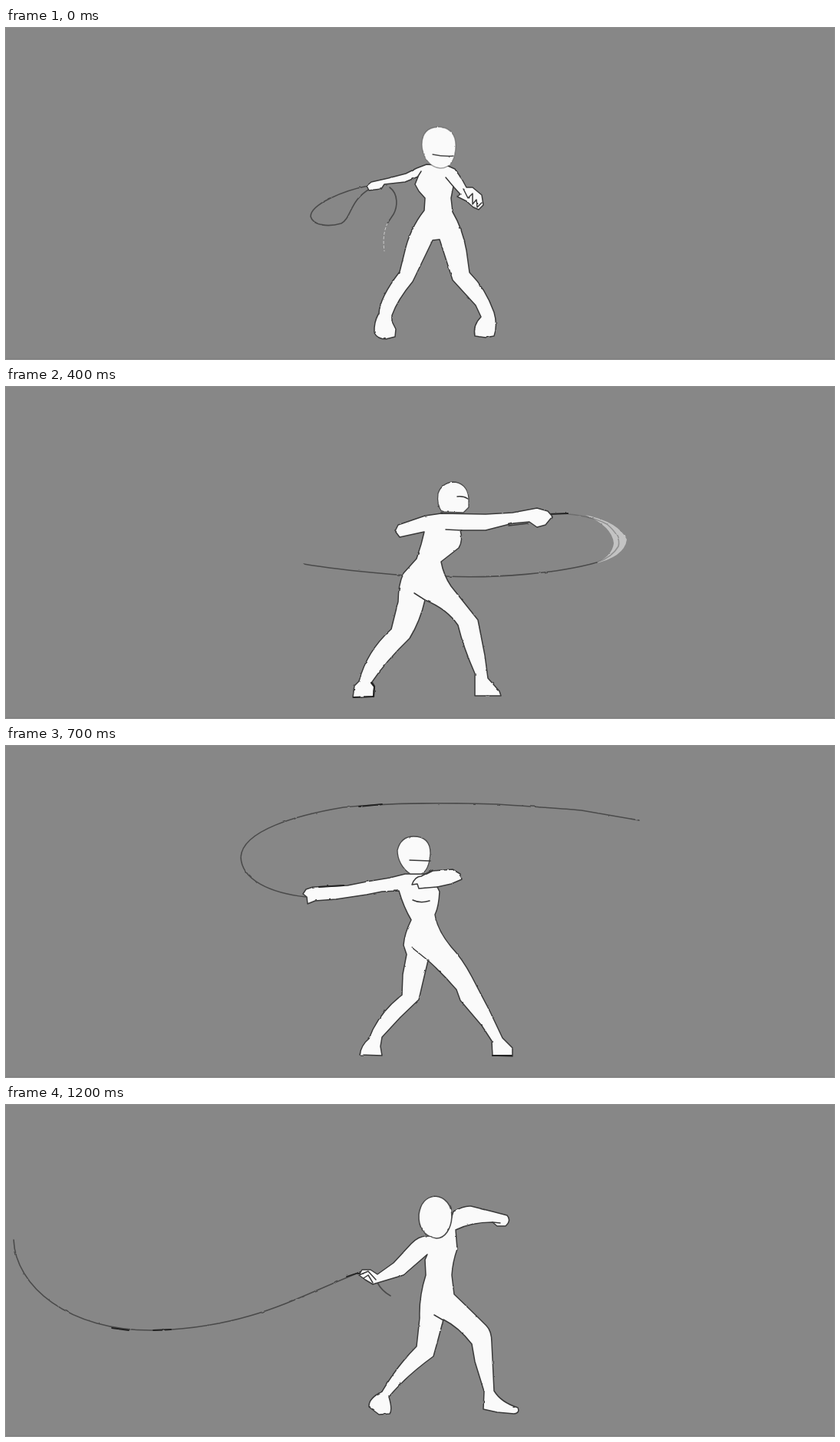
Write an HTML page without scripts that moves like this. It is 1079 by 432 pixels and loops after 1.3 s.

```html
<!DOCTYPE html>
<html lang="en">
<head>
<meta charset="utf-8">
<title>Whip swing</title>
<style>
html, body { margin: 0; width: 100%; height: 100%; overflow: hidden; background: #878787; }
svg { display: block; width: 100%; height: 100%; }
path { fill: none; stroke: #3a3a3a; stroke-width: 1.5; stroke-linejoin: round; stroke-linecap: round; }
.body, .head { fill: #fafafa; }
.head { stroke: #4a4a4a; stroke-width: 1.3; }
.whip { stroke: #4a4a4a; stroke-width: 1.6; }
.dark { stroke: #222; stroke-width: 2.2; }
.tip { stroke: #d0d0d0; stroke-width: 1; stroke-dasharray: 3 3; }
.smear { fill: url(#fade); stroke: none; }
.pose { opacity: 0; animation: show 1.3s step-end infinite; animation-delay: calc(var(--i) * .1s); }
@keyframes show { 0% { opacity: 1 } 7.6923%, 100% { opacity: 0 } }
</style>
</head>
<body>
<svg viewBox="0 0 1079 432" preserveAspectRatio="none">
<defs>
<linearGradient id="fade" x1="0" y1="0" x2="0" y2="1">
<stop offset="0" stop-color="#fff" stop-opacity="0"/>
<stop offset=".12" stop-color="#fff" stop-opacity=".2"/>
<stop offset=".3" stop-color="#fff" stop-opacity=".52"/>
<stop offset=".6" stop-color="#fff" stop-opacity=".57"/>
<stop offset="1" stop-color="#fff" stop-opacity="0"/>
</linearGradient>
<filter id="pencil" filterUnits="userSpaceOnUse" x="0" y="0" width="1079" height="432" color-interpolation-filters="sRGB">
<feTurbulence type="fractalNoise" baseFrequency=".12" numOctaves="2" seed="4"/>
<feDisplacementMap in="SourceGraphic" scale="2" xChannelSelector="R" yChannelSelector="G"/>
</filter>
</defs>

<g filter="url(#pencil)">
<g class="pose" style="--i:0">
<path class="whip" d="M472 206C440 212 397 230 397 246C400 258 420 260 437 255C450 248 448 225 474 210M500 208C512 217 510 234 505 243L497 255"/>
<path class="tip" d="M497 255Q490 270 493 291"/>
<path class="body" d="M548 178L535 183L521 190L498 196L476 201L470 206L473 212L489 210L493 204L520 201L537 194L533 204L538 213L546 222L545 238Q526 262 519 294L513 318Q487 352 486 372Q479 384 480 398Q484 406 495 406L507 403L508 393L503 383L503 375Q510 355 530 331L556 277L565 276L582 329L612 362L619 377Q608 388 611 402L625 404L636 402Q641 388 636 371Q625 340 604 319L600 290Q595 262 582 240L580 222L583 207L592 217L588 220L600 226L609 234L616 237L622 231L620 218L608 208L600 208L594 197L585 184L576 180Z"/>
<path class="head" style="stroke-opacity:.5" d="M563 129C578 129 586 139 586 153C586 170 580 183 566 183C551 182 542 166 542 152C542 138 549 130 563 129Z"/>
<path d="M573 195L583 207M541 187L536 195M596 210L602 222L608 216L608 230L613 224L614 234L620 228"/>
<path class="head" style="fill:none" d="M556 165Q570 168 583 167"/>
</g>

<g class="pose" style="--i:1">
<path class="whip" d="M486 206C455 204 430 222 437 236C450 250 480 238 500 213M585 225C600 235 606 248 598 258"/>
<path class="body" d="M562 159L548 160L532 178L505 192L488 201L484 208L491 214L504 209L530 203L541 194L544 215L543 224Q525 254 519 285L515 314Q488 345 481 367L470 380L470 404L498 404L500 394L494 379Q510 352 534 328L552 274L567 275L592 316L608 358L612 380L607 402L645 403L646 394L632 378Q628 345 616 310L592 258L580 238L579 218L585 204L597 210L606 214L611 204L602 190L592 178L588 166Z"/>
<path class="head" d="M580 123C594 123 602 133 602 147C602 161 596 173 584 174C570 173 558 161 558 146C558 132 567 124 580 123Z"/>
<path d="M584 155L600 157M552 182L541 195"/>
</g>

<g class="pose" style="--i:2">
<path class="whip" d="M477 219L508 206M583 217C600 228 628 240 627 254C624 266 604 264 594 256C583 248 580 235 580 218"/>
<path class="body" d="M574 147Q562 145 553 154L532 182L512 176L495 172L488 180L486 190L496 187L510 189L524 193L516 203L509 207L514 213L525 213L534 210L543 209L542 216L527 245Q519 262 518 280L516 308Q488 335 475 362L462 371L458 380L459 402L487 403L491 396L485 379Q505 350 538 325L546 300L551 271L568 272L601 303L601 330L606 358L605 384L602 402L652 403L653 394Q636 392 624 380L623 350L626 299L602 264L585 244L578 216L587 206L603 186L606 174L598 166L585 155Z"/>
<path class="head" d="M596 118C610 118 619 130 618 144C618 155 612 166 603 167C595 166 588 160 580 152C572 146 572 138 575 131C579 123 586 118 596 118Z"/>
<path d="M562 177L540 203L532 211M543 193Q546 202 543 209M543 270L568 272M465 377Q476 373 480 392L484 400M609 142L617 148"/>
<path class="dark" d="M487 403L459 402L458 380L465 372M606 402L651 403"/>
</g>

<g class="pose" style="--i:3">
<path class="whip" d="M480 238C500 240 560 246 610 246C670 245 715 238 718 226C716 212 685 204 650 203"/>
<path class="body" d="M574 157L555 160L536 176L509 174L498 180L496 190L507 192L537 194L541 206L538 222L523 244Q515 262 514 282L509 312Q480 340 468 373L457 382L455 403L483 404L486 393L481 382Q500 354 532 327L548 276L570 281L595 308L598 335L608 370L606 403L649 403L648 396L626 380L624 345L620 302L582 250L573 224L588 208L594 199L615 205L640 210L652 208L654 198L643 192L618 185L604 170L592 164Z"/>
<path class="head" d="M590 121C603 121 611 132 611 145C610 157 604 165 598 166L576 160C568 152 567 144 569 136C573 126 580 121 590 121Z"/>
<path d="M598 143L610 147M574 186L594 199M537 270L548 276"/>
</g>

<g class="pose" style="--i:4">
<path class="smear" style="fill:#fff;fill-opacity:.5" d="M755 167Q798 176 809 199Q806 222 765 231Q790 222 792 204Q790 182 755 167Z"/>
<path class="whip" d="M388 231C440 240 490 243 519 246M572 247C640 250 720 243 770 229"/>
<path class="whip" style="stroke-opacity:.4" d="M733 166Q765 169 783 179Q802 195 798 208Q790 222 770 229"/>
<path class="dark" d="M706 166L732 165"/>
<path class="body" d="M567 165L546 168L511 180L507 188L513 196L545 189L541 205L535 224L518 243Q511 258 511 280L502 316Q470 345 460 384L454 390L452 405L479 404L480 390L477 385Q495 358 526 328Q540 305 546 278Q575 290 589 311Q596 340 611 374L611 403L645 403L643 397L628 380L624 350L615 304L580 260Q570 245 567 228L590 210Q596 200 592 187L625 187L660 178L682 176L692 183L703 180L712 169L706 162L692 158L660 164L625 166Z"/>
<path class="head" d="M582 124C594 124 602 132 603 145L603 157L596 164L568 163C562 155 562 146 563 139C566 130 573 125 582 124Z"/>
<path d="M588 143Q596 142 602 146M573 186L593 187M532 269L546 278M655 181L680 178"/>
<path class="dark" d="M476 386L480 391L479 404M453 405L479 404"/>
</g>

<g class="pose" style="--i:5">
<path class="smear" d="M800 82Q900 92 950 130Q995 170 985 210Q970 250 860 270Q940 242 948 200Q944 140 800 82Z"/>
<path class="whip" d="M632 136C670 105 730 82 800 88C870 96 920 125 940 165"/>
<path class="body" d="M548 163L530 168L512 184L504 200L512 206L524 200L531 190L534 205L532 222L518 242Q513 262 513 285L507 314Q478 342 462 380L453 392L453 404L482 404L483 388Q500 362 531 329L546 277L586 311L592 328L618 374L619 403L653 403L650 396L633 378L612 300L571 248L563 222L574 205L578 192L600 180L625 160L637 146L633 133L622 132L612 143L596 157L576 163Z"/>
<path class="head" d="M559 119C572 119 579 130 579 143C578 156 573 165 562 166C548 165 539 152 539 140C540 127 548 120 559 119Z"/>
<path d="M560 143L578 144M556 190L578 192M530 262L546 277"/>
</g>

<g class="pose" style="--i:6">
<path class="smear" d="M720 36Q840 38 910 55Q985 82 1035 130Q1070 170 1063 210Q1056 255 960 312Q1015 280 1022 205Q1018 150 968 104Q900 50 720 36Z"/>
<path class="whip" d="M418 157C398 152 392 145 397 136C420 115 560 82 683 82C760 82 800 98 830 105C870 118 900 140 921 158"/>
<path class="tip" d="M822 103L832 106M860 117L876 126"/>
<path class="body" d="M524 164L515 161L475 154L441 154L434 147L418 149L409 157L412 167L424 170L438 166L470 171L513 181L521 200L527 220L518 240Q515 270 514 310L500 322Q475 350 464 378L454 393L454 404L485 403L486 392L483 384L535 330Q542 318 542 305L546 275L582 311L586 325L626 376L627 400L630 404L661 403L655 393L638 376L605 293L566 240L558 218L562 192L572 196L590 208L613 212L622 222L624 215L648 217L645 211L628 205L595 191L575 172L565 163L545 162Z"/>
<path class="head" d="M532 116C546 116 552 128 552 141C551 155 546 164 534 165C520 163 512 150 513 136C515 123 521 117 532 116Z"/>
<path d="M525 142L552 142M538 193Q550 198 563 192L567 182L563 175M518 180L530 186M526 235Q524 260 546 275M409 157L419 156M440 154V165M614 205V212"/>
<path class="dark" d="M596 191L622 202M620 347L638 376"/>
</g>

<g class="pose" style="--i:7">
<path class="whip" d="M391 197C345 192 307 175 306 145C308 110 380 90 440 80C500 74 580 74 640 76C700 80 740 83 750 84L825 97"/>
<path class="dark" style="stroke-width:1.8" d="M460 79L490 76"/>
<path class="body" d="M520 167L500 172L470 177L445 182L400 184L391 187L387 193L392 197L393 206L403 202L430 200L470 194L490 190L512 189Q518 210 528 227Q519 245 518 260L522 272L517 298L516 325Q492 343 478 370L473 382Q463 390 461 403L490 404L488 392L490 380L514 354L538 331Q544 305 550 280Q570 298 587 318L592 332L620 365L633 385L634 404L660 405L660 394L647 381L630 345L607 301Q595 278 580 262Q562 240 559 220Q564 210 565 190L562 184L580 180L594 174L592 167L582 161L556 163L548 167Z"/>
<path class="head" d="M531 118C545 118 553 124 553 140C552 155 548 164 541 167L527 167C516 160 510 148 510 136C513 124 520 118 531 118Z"/>
<path d="M526 149L553 150M562 184L538 186L536 180L529 181Q533 170 541 170L556 162M530 201Q540 206 552 202M529 263L550 280"/>
<path class="dark" d="M408 184L440 182M634 404L659 404"/>
</g>

<g class="pose" style="--i:8">
<path class="whip" d="M414 213C380 222 270 215 255 145C255 90 330 55 410 50C520 45 600 75 690 92"/>
<path class="body" d="M534 172L495 183L460 194L425 200L411 208L418 214L424 219L432 213L468 207L525 197L530 214L533 232Q523 250 523 266L526 280L522 323Q495 347 484 378L468 389L468 403L494 405L491 390L548 330L555 285L595 319L600 335L628 378L631 404L664 403L664 396L642 379L618 305L575 254L565 230L571 204L580 203L600 210L625 205L633 198L628 190L600 188L582 174L562 170Z"/>
<path class="head" d="M547 123C561 123 569 128 569 141C570 158 565 169 556 173L542 172C530 164 526 152 526 140C529 128 536 123 547 123Z"/>
<path d="M543 152L569 154M544 205Q553 210 565 206M534 268L555 285M571 190V204"/>
</g>

<g class="pose" style="--i:9">
<path class="whip" d="M446 228C420 237 385 244 350 245C280 240 215 205 213 140C213 85 265 29 365 28C440 30 500 70 560 86"/>
<path class="dark" d="M215 122Q217 103 224 92"/>
<path class="tip" d="M213 136V150M218 175L223 184M238 73L246 65"/>
<path class="body" d="M548 177L540 177L495 197L465 209L445 214L433 222L445 226L443 231L453 232L460 224L495 214L520 205L537 202L540 218L538 236Q528 248 528 265L531 283L528 321Q505 338 492 372L474 385L472 402L495 406L499 402L492 392L557 329Q557 310 562 290Q583 310 604 319L608 340L624 375L627 402L640 405L668 405L668 398Q648 388 639 379L635 345L627 307L600 278Q578 255 571 236Q573 222 577 213L583 207L594 222L601 226L645 225L657 228L662 224L669 222L667 212L657 209L645 212L610 210L586 180L576 176Z"/>
<path class="head" d="M563 128C575 127 583 131 584 142C586 160 582 174 571 179L557 176C545 168 542 155 542 143C545 132 552 128 563 128Z"/>
<path d="M559 155L584 158M558 208Q566 215 577 211M584 194V207M540 273Q548 276 562 290M650 214L657 223M658 210L663 222"/>
</g>

<g class="pose" style="--i:10">
<path class="whip" d="M450 226C400 242 250 275 150 235C70 195 90 70 200 30C260 12 330 25 390 50"/>
<path class="body" d="M549 175L523 186L492 202L465 214L450 215L438 222L448 229L460 231L466 224L502 217L541 200L542 220L540 238Q532 255 532 270L533 283L530 319Q507 340 493 373L475 385L473 400L492 406L499 402L494 388L557 329L564 287Q586 305 605 316L609 338L624 375L625 401L664 403L668 397L638 377L628 301L581 254L574 232L580 206L584 194L600 207L640 204L654 206L665 200L665 192L652 189L610 192L588 172Z"/>
<path class="head" d="M562 125C575 125 583 132 583 144C584 161 579 173 568 177L557 175C545 168 540 156 541 143C543 131 551 125 562 125Z"/>
<path d="M561 154L583 156M560 206Q568 212 578 208M546 273L564 287M650 190L656 202"/>
</g>

<g class="pose" style="--i:11">
<path class="whip" d="M456 223C380 255 250 295 140 275C40 250 15 150 60 80C90 45 150 40 200 55"/>
<path class="body" d="M550 173L531 183L498 204L475 218L460 216L449 222L458 229L470 233L510 220L545 198L545 224L540 242L536 281L533 317Q509 340 491 373L475 384L473 398L489 405L500 402L497 384Q520 357 557 328L567 283Q588 297 606 314L610 336L623 375L623 399L660 404L668 396L637 375L630 297L583 250L577 228L583 198L587 180L604 182L636 179L651 184L661 178L659 169L643 165L605 163L586 160L575 168Z"/>
<path class="head" d="M560 122C574 122 582 132 582 145C582 161 575 174 564 176C548 173 539 159 539 143C541 129 549 123 560 122Z"/>
<path d="M552 274L567 283M456 222L464 220L468 229"/>
</g>

<g class="pose" style="--i:12">
<path class="whip" d="M10 176C12 235 80 296 195 294C320 290 380 250 462 218M484 232Q490 243 501 249"/>
<path class="dark" style="stroke-width:1.8" d="M138 291L160 294M192 294L215 293M444 224L462 218"/>
<path class="body" d="M551 171Q538 170 528 181L505 206L484 221L475 215L464 215L460 222L468 228L478 234L518 222L549 195L546 202L547 222Q538 250 539 278L535 315Q510 340 490 374Q472 383 473 394L486 404L500 403Q504 398 499 381Q520 355 557 328L562 310L570 280Q590 290 607 312L611 335L623 374L622 397L640 401L662 403Q670 402 667 395Q645 388 636 373L633 310Q633 295 626 288Q608 270 584 247L581 222Q582 205 588 188L586 163Q606 153 634 153L640 158L651 158Q659 151 653 144L634 139L606 132Q597 131 583 139L575 165Z"/>
<path class="head" style="stroke-width:1.6" d="M559 119C573 120 581 131 581 146C580 162 572 174 561 174C545 172 537 160 538 143C540 128 548 120 559 119Z"/>
<path d="M558 274L570 281M460 222L472 217L482 228M466 226L472 222L478 232M634 153L644 154"/>
</g>
</g>
<path d="M0 431.5H1079" style="stroke:#7f7f7f;stroke-width:1"/>
</svg>
</body>
</html>
```
